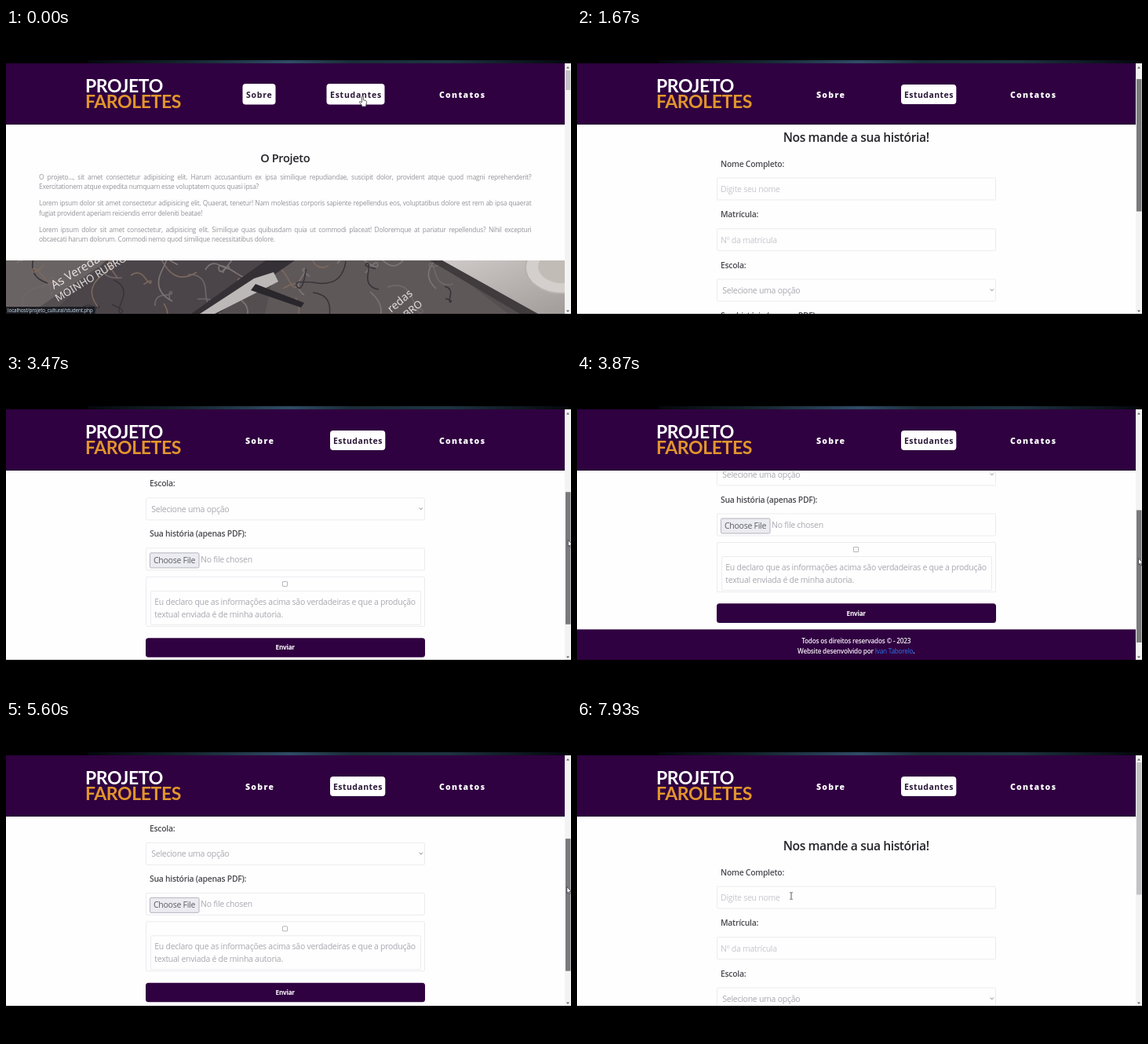
An HTML page that plays this animation: 720 by 405 pixels, repeating every 8 s.

```html
<!DOCTYPE html>
<html lang="pt">
<head>
<meta charset="utf-8">
<title>Projeto cultural</title>
<style>
html, body { margin: 0; width: 100%; height: 100%; overflow: hidden; background: #000; }
svg { display: block; width: 100vw; height: 100vh; }
text, p { font-family: "Open Sans", "Noto Sans", sans-serif; letter-spacing: -.025em; }
p { margin: 0 0 8.4px; font-size: 8.4px; line-height: 12.6px; color: #94949b; }
p span { display: block; white-space: nowrap; }
p span:first-child { text-align: justify; text-align-last: justify; }
.mid { text-anchor: middle; }
.nav { font-size: 10.5px; font-weight: 800; letter-spacing: 1.3px; fill: #fff; }
.nav.on { font-weight: 700; fill: #2b1838; letter-spacing: .45px; }
.nav.wide { letter-spacing: .75px; }
.logo { font: 700 23px Lato, sans-serif; letter-spacing: -.4px; }
.cover { font-family: "Noto Sans", sans-serif; font-weight: 500; fill: #e2dfe0; letter-spacing: 0; }
.field { fill: none; stroke: #ececf0; }
.edge { stroke: #35353a; stroke-width: .8; stroke-linejoin: round; fill: #fff; }
</style>
</head>
<body>
<svg viewBox="0 0 720 405" preserveAspectRatio="none">
  <defs>
    <clipPath id="view"><rect y="45" width="720" height="319"/></clipPath>
    <clipPath id="photoBox"><rect y="296" width="712" height="68"/></clipPath>
    <linearGradient id="strip">
      <stop offset="0" stop-color="#04070c"/><stop offset=".2" stop-color="#14252c"/>
      <stop offset=".42" stop-color="#2f4c66"/><stop offset=".55" stop-color="#192d36"/>
      <stop offset=".75" stop-color="#1d3440"/><stop offset="1" stop-color="#04070c"/>
    </linearGradient>
    <linearGradient id="table" x2="1" y2="1">
      <stop offset="0" stop-color="#cfcbc9"/><stop offset="1" stop-color="#a19c9a"/>
    </linearGradient>
  </defs>
  <rect width="720" height="405"/>
  <rect x="104" y="41" width="612" height="4" fill="url(#strip)"/>

  <g clip-path="url(#view)">
    <rect y="45" width="720" height="319" fill="#fefefe"/>

    <g id="about">
      <foreignObject x="42" y="183.5" width="627.5" height="105">
        <p><span>O projeto..., sit amet consectetur adipisicing elit. Harum accusantium ex ipsa similique repudiandae, suscipit dolor, provident atque quod magni reprehenderit?</span><span>Exercitationem atque expedita numquam esse voluptatem quos quasi ipsa?</span></p>
        <p><span>Lorem ipsum dolor sit amet consectetur adipisicing elit. Quaerat, tenetur! Nam molestias corporis sapiente repellendus eos, voluptatibus dolore est rem ab ipsa quaerat</span><span>fugiat provident aperiam reiciendis error deleniti beatae!</span></p>
        <p><span>Lorem ipsum dolor sit amet consectetur, adipisicing elit. Similique quas quibusdam quia ut commodi placeat! Doloremque at pariatur repellendus? Nihil excepturi</span><span>obcaecati harum dolorum. Commodi nemo quod similique necessitatibus dolore.</span></p>
      </foreignObject>
      <g clip-path="url(#photoBox)">
        <rect y="296" width="712" height="68" fill="#544e50"/>
        <path d="M0 296H130L30 364H0Z" fill="#6a6364"/>
        <path d="M128 296H345L262 364H58Z" fill="#4b4549"/>
        <path d="M345 296H552L640 364H330Z" fill="#5f5858"/>
        <g id="swirls" fill="none" stroke-width="1.6"/>
        <path d="M331 296H368L270 364H236Z" fill="#343035"/>
        <path d="M316 319L341 311L347 323L266 364H247Z" fill="#bcb8b7"/>
        <path d="M318 326L380 350L376 356L312 334Z" fill="#2a272c"/>
        <path d="M548 296H712V364H666Z" fill="url(#table)"/>
        <path d="M540 296H556L678 364H655Z" fill="#403b3d"/>
        <ellipse cx="708" cy="305" rx="46" ry="33" fill="#d3cfcc" stroke="#b7b1ac" stroke-width="2"/>
        <ellipse cx="709" cy="304" rx="31" ry="21" fill="#c2bcb6"/>
        <text class="cover" font-size="15" transform="translate(61 333) rotate(-31)">As Veredas</text>
        <text class="cover" font-size="13" transform="translate(66 349) rotate(-31)">MOINHO RUBRO</text>
        <text class="cover" font-size="14" transform="translate(491 363) rotate(-40)">redas</text>
        <text class="cover" font-size="13" transform="translate(511 370) rotate(-40)">BRO</text>
      </g>
    </g>

    <g id="form"></g>

    <rect y="45" width="712" height="78" fill="#2f0140"/>
    <rect y="122" width="712" height="1" fill="#1d0328"/>
    <text class="logo" x="101" y="82" fill="#fff">PROJETO</text>
    <text class="logo" x="101" y="102" fill="#e2962c">FAROLETES</text>
    <rect id="sobreBox" x="301.5" y="71" width="42" height="26.5" rx="4" fill="#fff"/>
    <text id="sobre" class="nav" y="88.5">Sobre</text>
    <rect id="alunosBox" rx="4" fill="#fff"/>
    <text id="alunos" class="nav on" y="88.5">Estudantes</text>
    <text class="nav" x="552" y="88.5">Contatos</text>

    <rect x="712" y="45" width="8" height="319" fill="#f3f3f4"/>
    <path d="M714 51.5L716 49L718 51.5ZM714 359.5L716 362L718 359.5Z" fill="#66666a"/>
    <rect id="thumb" x="713" width="6.5"/>

    <g id="status">
      <rect y="355" width="113.5" height="9" fill="#1c1d22"/>
      <text x="2" y="362" font-size="6.4" fill="#cfe0f2">localhost/projeto_cultural/student.php</text>
    </g>
  </g>

  <g id="cursor">
    <path id="hand" class="edge" d="M-1.6 -6C-1.6 -7.5 .4 -7.5 .4 -6V-2.2L3.6 -1.4Q4.8 -1 4.6 .6L3.8 4V6H-1.6V4.4L-4.4 .8C-5 -.4 -3.6 -1.2 -2.8 -.2L-1.6 1Z"/>
    <path id="arrow" class="edge" d="M-2.2 -4.5V3.5L-.4 2L.9 4.8L2.2 4.2L1 1.5H3.4Z"/>
    <path id="beam" d="M-1.8 -4.3H-.5L0 -3.8L.5 -4.3H1.8M0 -3.8V3.8M-1.8 4.3H-.5L0 3.8L.5 4.3H1.8" fill="none" stroke="#4b4b50" stroke-width=".9"/>
  </g>
</svg>
<script>
const $ = id => document.getElementById(id);
const CENTER = 355.7, INK = '#4a4a50', DARK = '#25252b', SOFT = '#a8a8b0', HINT = '#c6c6ce';
const PURPLE = '#300141', PALE = '#f6f2f8';

// y is the optical middle of the line
const label = (x, y, str, size, fill, weight = 400, cls = '') =>
  `<text class="${cls}" x="${x}" y="${y + size * .35}" font-size="${size}" fill="${fill}" font-weight="${weight}">${str}</text>`;
const mid = (y, str, size, fill, weight) => label(CENTER, y, str, size, fill, weight, 'mid');
const box = (x, y, w, h, attrs = 'class="field"') =>
  `<rect x="${x}" y="${y}" width="${w}" height="${h}" rx="1.5" ${attrs}/>`;

$('about').insertAdjacentHTML('beforeend', mid(166, 'O Projeto', 14.6, DARK, 600));

const fields = [
  [194, 'Nome Completo:', 183, 'Digite seu nome', HINT],
  [258.7, 'Matrícula:', 183, 'Nº da matrícula', HINT],
  [323, 'Escola:', 185.3, 'Selecione uma opção', SOFT],
  [387, 'Sua história (apenas PDF):', 248, 'No file chosen', SOFT]
].map(([y, name, x, hint, color]) =>
  label(183, y, name, 10.4, INK, 600) + box(178.5, y + 18, 355, 28) + label(x, y + 32.5, hint, 10.5, color));

const icons = [
  `<rect x="-4" y="-3" width="8" height="6" rx="1" fill="#fff"/><path d="M-4 -1.8L0 1.2L4 -1.8" fill="none" stroke="${PURPLE}" stroke-width=".9"/>`,
  '<path d="M3 -3.2C3 .8 .8 3 -3.2 3" fill="none" stroke="#fff" stroke-width="1.7"/><path d="M2 -3.7L4 -3.2L3.2 -.6L1.4 -1.4ZM-3.7 2L-3.2 4L-.6 3.2L-1.4 1.4Z" fill="#fff"/>',
  '<rect x="-3.2" y="-3.2" width="6.4" height="6.4" fill="#fff"/>'
].map((art, i) => `<g transform="translate(${331.8 + i * 24.4} 605)">
  ${box(-10.8, -7.7, 21.6, 15.4, `fill="none" stroke="${PALE}"`)}${art}</g>`);

$('form').innerHTML = mid(161, 'Nos mande a sua história!', 15.6, DARK, 600) + fields.join('') +
  '<path d="M526.8 353.5L528.8 355.8L530.8 353.5" fill="none" stroke="#85858c"/>' +
  box(183.5, 411, 62.5, 19, 'fill="#ebebf1" stroke="#b4b4bd"') + label(188, 420.5, 'Choose File', 10.5, '#5c5c64') +
  box(178.5, 441.5, 355, 63) + box(184.5, 459.5, 344, 43) +
  '<rect x="352.5" y="447.5" width="6" height="6" rx=".5" fill="#fff" stroke="#a2a2aa" stroke-width=".8"/>' +
  label(189.3, 473.5, 'Eu declaro que as informações acima são verdadeiras e que a produção', 10.5, SOFT) +
  label(189.3, 489.2, 'textual enviada é de minha autoria.', 10.5, SOFT) +
  `<rect x="178" y="519.3" width="356" height="24.7" rx="3.5" fill="${PURPLE}"/>` + mid(531.8, 'Enviar', 8.1, '#fff', 700) +
  `<rect y="552.3" width="712" height="67" fill="${PURPLE}"/>` +
  mid(567.3, 'Todos os direitos reservados © - 2023', 8.2, PALE, 600) +
  mid(580, 'Website desenvolvido por <tspan fill="#2a76f0" font-weight="400">Ivan Taborelo</tspan>.', 8.2, PALE, 600) +
  icons.join('');

const tones = ['#7d7475', '#39343a', '#6f686a', '#7c685f'];
$('swirls').innerHTML = Array.from({ length: 40 }, (_, i) => {
  const x = i * 137 % 590, y = 292 + i * 29 % 76, r = 7 + i * 7 % 17;
  return `<path stroke="${tones[i % 4]}" transform="rotate(${i * 67 % 360} ${x} ${y})"
    d="M${x} ${y}q${r} ${-r} ${2 * r} 0t${r} ${r / 2}t${-r} ${r / 2}"/>`;
}).join('');

// time, x, y of the pointer
const path = [
  [0, 455, 94], [900, 457, 94], [1350, 718, 119], [1450, 721, 119], [1670, 724, 130.1],
  [3470, 718.5, 216], [4330, 717, 266], [4530, 717, 274], [4950, 717, 274], [5600, 717, 217],
  [6270, 719.5, 134.4], [6430, 719, 118], [6700, 718, 118], [7600, 273, 224], [8000, 273, 224]
];
const SWITCH = 500, LEAVE = 960, GRAB = 1450, RELEASE = 6500, MAX_SCROLL = 255;

function pointer(t) {
  const i = path.findIndex(p => p[0] > t), a = path[i - 1], b = path[i];
  const k = (t - a[0]) / (b[0] - a[0]);
  return [a[1] + (b[1] - a[1]) * k, a[2] + (b[2] - a[2]) * k];
}

const set = (id, attrs) => { for (const k in attrs) $(id).setAttribute(k, attrs[k]); };
const show = (id, on) => { $(id).style.display = on ? '' : 'none'; };

function draw(now) {
  const t = now % 8000, [x, y] = pointer(t);
  const onForm = t >= SWITCH, hover = t < LEAVE, drag = t >= GRAB && t < RELEASE;
  const scroll = drag ? Math.min(MAX_SCROLL, Math.max(0, (y - 119) / .53)) : 0;

  show('about', !onForm);
  show('form', onForm);
  show('sobreBox', !onForm);
  show('status', hover);
  set('form', { transform: `translate(0 ${-scroll})` });
  set('sobre', { x: onForm ? 305 : 306, class: onForm ? 'nav' : 'nav on wide' });
  set('alunos', { x: hover ? 413 : 417, class: hover ? 'nav on wide' : 'nav on' });
  set('alunosBox', hover ? { x: 408.5, y: 71, width: 74, height: 26.5 } : { x: 413, y: 72, width: 70.3, height: 25 });
  set('thumb', {
    y: 54 + scroll * .526, height: onForm ? 168.5 : 25,
    fill: drag ? '#7a7a7d' : '#c3c3c6'
  });

  const beam = onForm && x > 178 && x < 534 && y > 212;
  set('cursor', { transform: `translate(${x} ${y})` });
  show('hand', hover);
  show('beam', beam);
  show('arrow', !hover && !beam);
}

const start = performance.now();
(function tick() {
  draw(performance.now() - start);
  requestAnimationFrame(tick);
})();
</script>
</body>
</html>
```
